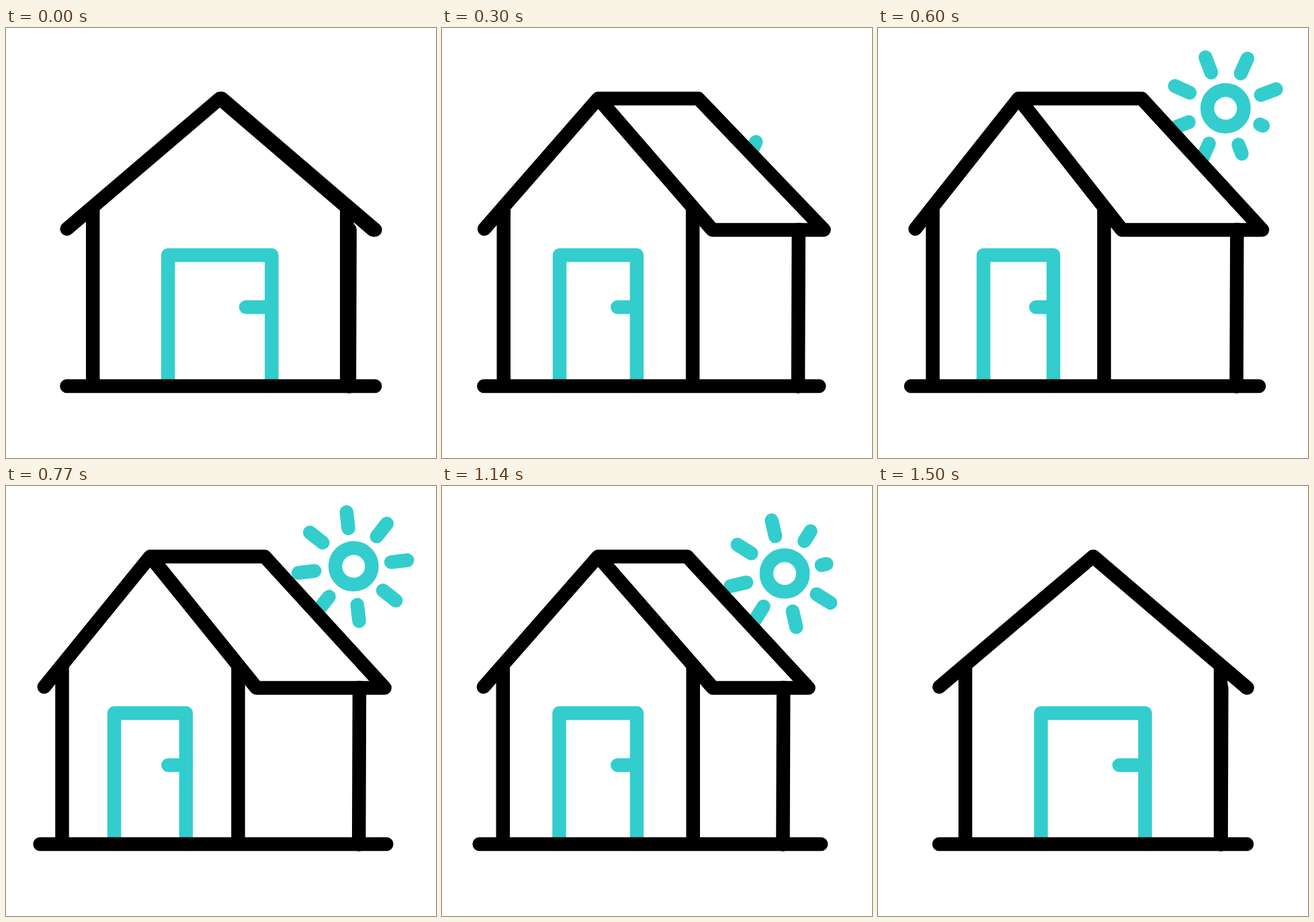
Recreate the animation shown at these times as an HTML page. Size 640 by 640 pixels, loop 1770 ms.

```html
<!DOCTYPE html>
<html lang="en">
<head>
<meta charset="utf-8">
<title>House and sun</title>
<style>
  html, body { margin: 0; width: 100%; height: 100%; overflow: hidden; background: #fff; }
  svg { display: block; width: 100vw; height: 100vh; }
  path, line, circle { fill: none; stroke-width: 20.5; stroke-linecap: round; stroke-linejoin: round; }
  .ink { stroke: #000; }
  .teal { stroke: #33cdcd; }
  #body { fill: #fff; }
  #walls { stroke-linecap: butt; }
</style>
</head>
<body>
<svg viewBox="0 0 640 640">
  <g id="sun" class="teal"><circle cx="1.1" cy="-0.4" r="27.2"/><g id="rays"/></g>
  <path id="body"/>
  <path id="door" class="teal"/>
  <path id="walls" class="ink"/>
  <path id="side" class="ink"/>
  <path id="ground" class="ink"/>
  <path id="gable" class="ink"/>
  <path id="roof" class="ink"/>
</svg>
<script>
const LOOP = 1770, STEP = 100 / 3, END = 1500;
const $ = id => document.getElementById(id);
const set = (id, d) => $(id).setAttribute("d", d);
const ramp = (t, from, to) => Math.max(0, Math.min(1, (t - from) / (to - from)));
const smooth = (t, from, to) => {
  const u = ramp(t, from, to);
  return u * u * (3 - 2 * u);
};

const rays = Array.from({ length: 8 }, (_, i) => {
  const ray = document.createElementNS("http://www.w3.org/2000/svg", "line");
  ray.setAttribute("transform", `rotate(${90 - 45 * i})`);
  ray.setAttribute("y1", -57.3);
  return $("rays").appendChild(ray);
});

function drawSun(t) {
  const away = 112 * (1 - smooth(t, 160, 585) + smooth(t, 1062, 1522));
  const turn = 0.5 - 134 * ramp(t, 996, 0) ** 2 - 115.4 * ramp(t, 943, END) ** 2;
  $("sun").setAttribute("transform", `translate(${516.2 - away} ${119.9 + away * 1.48})`);
  $("rays").setAttribute("transform", `rotate(${turn})`);

  // Rays grow and shrink one after another
  rays.forEach((ray, i) => {
    const lag = t - i * 2 * STEP, span = 5 * STEP;
    const len = ramp(lag, 100, 100 + span) - ramp(lag, 1020, 1020 + span);
    ray.setAttribute("y2", -57.3 - 24.3 * len);
    ray.setAttribute("visibility", len > 0.001 ? "visible" : "hidden");
  });
}

// Opens by gain, slides back slowly, then folds shut with a swing on the way
function pose(t, opened, shut, gain, slide, swing) {
  const u = ramp(t, 1050, END);
  return shut + gain * smooth(t, -35, opened) - slide * ramp(t, 600, END)
    + (slide - gain) * u ** 1.6 - swing * 9.48 * u ** 3 * (1 - u);
}

function drawHouse(t) {
  const left = pose(t, 441, 130, -48.5, -11, -4);
  const right = pose(t, 441, 510, -173.5, -48.6, 0);
  const farTop = pose(t, 410, 320, 72.5, 41, 24);
  const farEave = pose(t, 410, 549, 23, 45, 25);
  const farWall = pose(t, 410, 510.5, 23, 45, 18);
  const spread = pose(t, 501, 0, 1, 0.2, -0.3);

  const at = f => left + (right - left) * f;
  const low = at(-0.102), top = at(0.5), eave = at(1.102);
  const far = `${farTop} 105L${farEave} 300.4`;

  set("body", `M${low} 299L${top} 105L${far}L${farWall} 300V533H${left}V267Z`);
  set("door", `M${at(0.296)} 533V338H${at(0.704)}V533M${at(0.6025)} 415.5H${at(0.704) + 0.3}`);
  set("walls", `M${left} 267V533M${right} 267V533`);
  set("side", `M${farWall + 0.8} 300L${farWall} 533.5`);
  set("ground", `M${91 - 42 * spread} 533H${549 + 18 * spread}`);
  set("gable", `M${low} 299L${top} 105L${eave} 300`);
  set("roof", `M${top + 0.8} 105L${far}L${eave + 0.8} 300.4Z`);
}

const start = performance.now();
function frame() {
  const now = (performance.now() - start) % LOOP;
  const t = Math.min(END, Math.floor(now / STEP + 0.001) * STEP);
  drawSun(t);
  drawHouse(t);
  requestAnimationFrame(frame);
}
frame();
</script>
</body>
</html>
```
